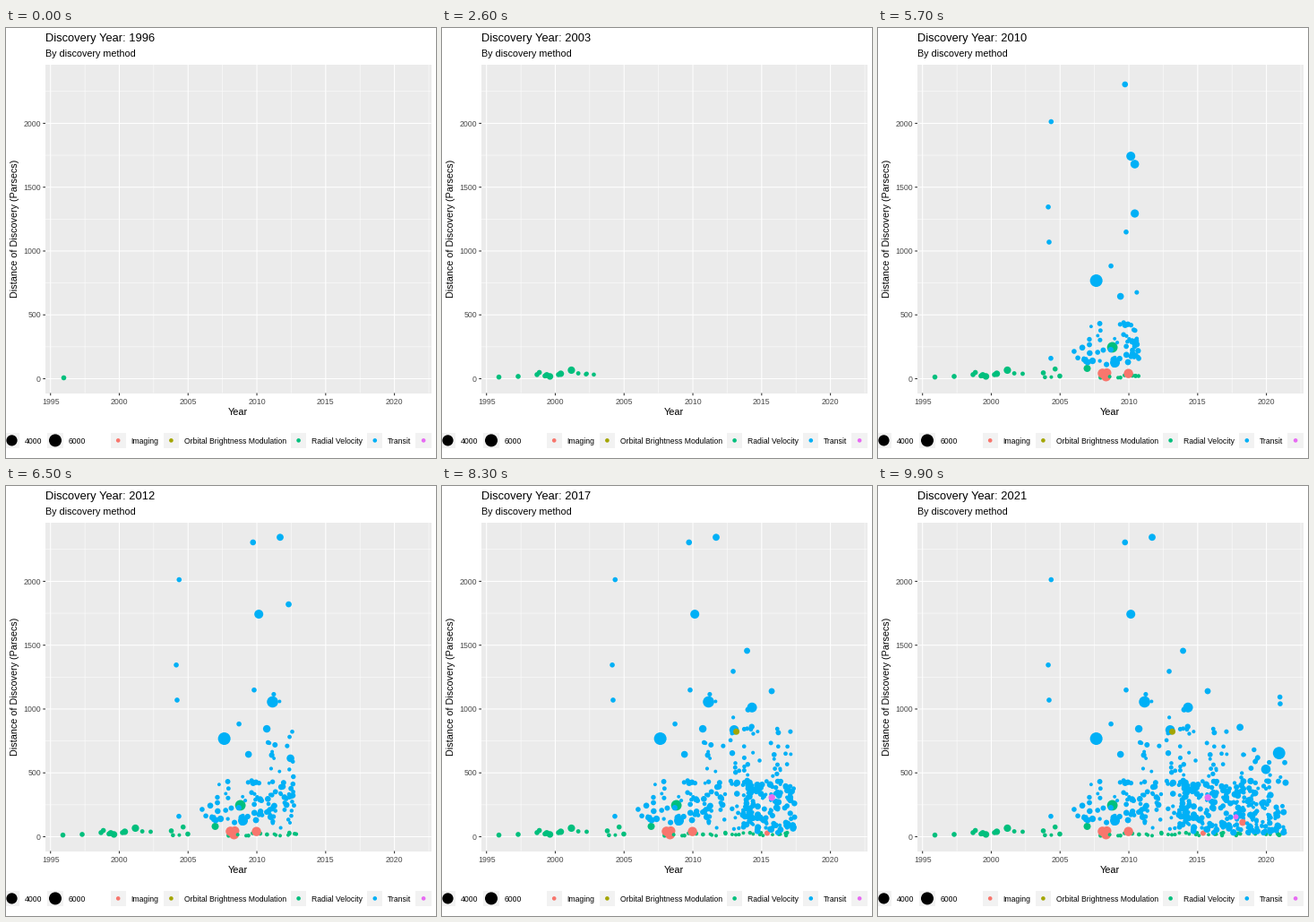
A matplotlib script for the animation above (10 s loop, 480 px wide and 480 px high).

```python
import random

import matplotlib.pyplot as plt
import numpy as np
from matplotlib.animation import FuncAnimation
from matplotlib.colors import to_rgba
from matplotlib.patches import Circle, Rectangle

SIZE, DPI = 480, 80
PT = 72 / DPI                      # points per pixel
FRAMES, INTERVAL = 100, 100
FIRST, LAST = 1996, 2021

IMAGING, ORBITAL, RADIAL, TRANSIT, TIMING = METHODS = (
    "#F8766D", "#A3A500", "#00BF7D", "#00B0F6", "#E76BF3")

rng = random.Random(12)
states = {}                        # year -> method -> [(x, y, radius)]


def year_x(year):
    return 49.7 + (year - 1995) * 15.356


def dist_y(parsecs):
    return 391.5 - parsecs * 0.14254


def add(method, year, parsecs, radius=2.8):
    """Store a jittered point in the year it belongs to."""
    by_method = states.setdefault(round(year), {})
    point = (year_x(year), dist_y(parsecs), radius)
    by_method.setdefault(method, []).append(point)


def add_crowd(method, year, count, low, high, skew=1.0, spread=1.8):
    """Random small points between two distances, jittered within a year."""
    for _ in range(count):
        parsecs = low + (high - low) * rng.random() ** skew
        radius = 1.9 + spread * rng.random() ** 1.4
        add(method, year + rng.uniform(-0.4, 0.4), parsecs, radius)


# Points that stand out from the crowd: year, distance and, if large, radius
KEY_POINTS = {
    RADIAL: [
        (1995.9, 13), (1997.3, 18), (1998.67, 32), (1998.84, 49),
        (1999.25, 22), (1999.38, 28, 3.4), (1999.61, 18, 3.7),
        (2000.23, 32), (2000.4, 39, 3.6), (2001.17, 67, 4.1),
        (2001.67, 42, 2.4), (2002.28, 39, 2.4), (2003.9, 12, 2.3),
        (2004.36, 13, 2), (2003.78, 46), (2004.64, 76), (2004.98, 21),
        (2006.97, 81, 4), (2008.8, 246, 5.9)],
    TRANSIT: [
        (2004.35, 2013), (2004.14, 1345), (2004.2, 1070), (2004.33, 160),
        (2006.02, 214), (2006.29, 163), (2007.63, 768, 7), (2008.7, 883),
        (2008.99, 126, 5.5), (2009.39, 645, 3.8), (2009.72, 2305, 3.3),
        (2010.14, 1743, 5), (2009.8, 1149), (2011.14, 1056, 6.3),
        (2010.72, 845, 4.2), (2011.69, 2345, 3.9), (2012.93, 1295),
        (2013, 836, 5.3), (2013.94, 1456, 3.4), (2014.3, 1012, 5.5),
        (2015.73, 1140, 3.4), (2018.08, 857, 3.9), (2019.96, 528, 5.3),
        (2020.92, 655, 6.9), (2020.98, 1094), (2021, 1041)],
    IMAGING: [
        (2008.08, 42, 5.3), (2008.34, 18, 5.5), (2008.4, 46, 5),
        (2009.97, 41, 5.2), (2015.4, 28, 3), (2018.27, 112, 3.8)],
    ORBITAL: [(2013.16, 823, 3.5)],
    TIMING: [(2015.74, 307, 3.7), (2017.78, 155, 3)],
}
for method, points in KEY_POINTS.items():
    for point in points:
        add(method, *point)

# Transit counts per year from 2007: nearby and remote
NEAR = (11, 8, 8, 16, 21, 15, 11, 60, 30, 40, 34, 36, 42, 36, 24)
FAR = (0, 0, 0, 0, 8, 3, 9, 14, 2, 12, 5, 4, 5, 2, 2)
for i, (near, far) in enumerate(zip(NEAR, FAR)):
    year = 2007 + i
    low = max(30, 110 - 9 * i)
    add_crowd(TRANSIT, year, near, low, 440, 1 + 0.25 * max(0, i - 10))
    if far:
        add_crowd(TRANSIT, year, far, 460, 1200 - 65 * (i - 5), 1.2, 1.3)
    if year > 2007:
        add_crowd(RADIAL, year, 3, 8, 32, spread=0.6)

years = sorted(states)
stops = [round((y - FIRST) * (FRAMES - 1) / (LAST - FIRST)) for y in years]

plt.rcParams["font.family"] = "Liberation Sans"
fig = plt.figure(figsize=(SIZE / DPI, SIZE / DPI), dpi=DPI, facecolor="white")
ax = fig.add_axes([0, 0, 1, 1])
ax.set_xlim(0, SIZE)
ax.set_ylim(SIZE, 0)
ax.axis("off")


def box(x, y, w, h, color):
    ax.add_patch(Rectangle((x, y), w, h, fc=color, lw=0, zorder=0))


def line(x0, y0, x1, y1, width=1.07, color="white"):
    ax.plot([x0, x1], [y0, y1], color=color, lw=width * PT, zorder=1,
            solid_capstyle="butt", snap=False)


def text(x, y, label, size, color="black", **kw):
    return ax.text(x, y, label, fontsize=size * PT, color=color,
                   va="baseline", rotation_mode="anchor", **kw)


# Panel, grid and axes
L, T, R, B = 44, 40.5, 474.6, 407.5
box(L, T, R - L, B - T, "#EBEBEB")
for i in range(6):
    x = year_x(1997.5 + 5 * i)
    line(x, T, x, B, 0.53)
for i in range(5):
    y = dist_y(250 + 500 * i)
    line(L, y, R, y, 0.53)
for i in range(6):
    x = year_x(1995 + 5 * i)
    line(x, T, x, B)
    line(x, B, x, B + 2.75, color="#333333")
    text(x, 419.7, str(1995 + 5 * i), 8.8, "#4D4D4D", ha="center")
for i in range(5):
    y = dist_y(500 * i)
    line(L, y, R, y)
    line(L - 2.75, y, L, y, color="#333333")
    text(39, y + 3.1, str(500 * i), 8.8, "#4D4D4D", ha="right")

text(259.3, 432, "Year", 11, ha="center")
text(13, 224, "Distance of Discovery (Parsecs)", 10.8, ha="center", rotation=90)
title = text(44, 15, "", 12.95)
text(44, 32, "By discovery method", 10.75)

# Legend
KEY_Y, KEY = 460.4, 17.28
for x, radius, color, label in (
        (6.5, 6.1, "black", "4000"),
        (55, 7, "black", "6000"),
        (125.2, 2.3, IMAGING, "Imaging"),
        (184.4, 2.3, ORBITAL, "Orbital Brightness Modulation"),
        (326.6, 2.3, RADIAL, "Radial Velocity"),
        (411.8, 2.3, TRANSIT, "Transit"),
        (466.1, 2.3, TIMING, "")):
    box(x - KEY / 2, KEY_Y - KEY / 2, KEY, KEY, "#F2F2F2")
    ax.add_patch(Circle((x, KEY_Y), radius, fc=color, lw=0))
    text(x + 14.3, 463.8, label, 8.65)

cloud = ax.scatter([], [], lw=0, zorder=3)


def resting(year):
    return [(p, m) for m in (RADIAL, TRANSIT, IMAGING, ORBITAL, TIMING)
            for p in states[year].get(m, [])]


def moving(year, following, t):
    """Pair points of the same method in order and move them linearly."""
    moved = []
    for method in METHODS:
        pairs = zip(states[year].get(method, []),
                    states[following].get(method, []))
        for a, b in pairs:
            moved.append((np.add(a, np.subtract(b, a) * t), method))
    return moved


def draw(frame):
    now = FIRST + frame * (LAST - FIRST) / (FRAMES - 1)
    title.set_text(f"Discovery Year: {int(now + 0.5)}")

    k = max(i for i, stop in enumerate(stops) if stop <= frame)
    shown = [item for year in years[:k + 1] for item in resting(year)]
    if frame > stops[k]:
        t = (frame - stops[k]) / (stops[k + 1] - stops[k])
        shown += moving(years[k], years[k + 1], t)

    data = np.array([p for p, _ in shown])
    cloud.set_offsets(data[:, :2])
    cloud.set_sizes((2 * data[:, 2] * PT) ** 2)
    cloud.set_facecolors([to_rgba(m) for _, m in shown])
    return cloud, title


anim = FuncAnimation(fig, draw, frames=FRAMES, interval=INTERVAL,
                     repeat=True, repeat_delay=0, blit=False)
plt.show()
```
